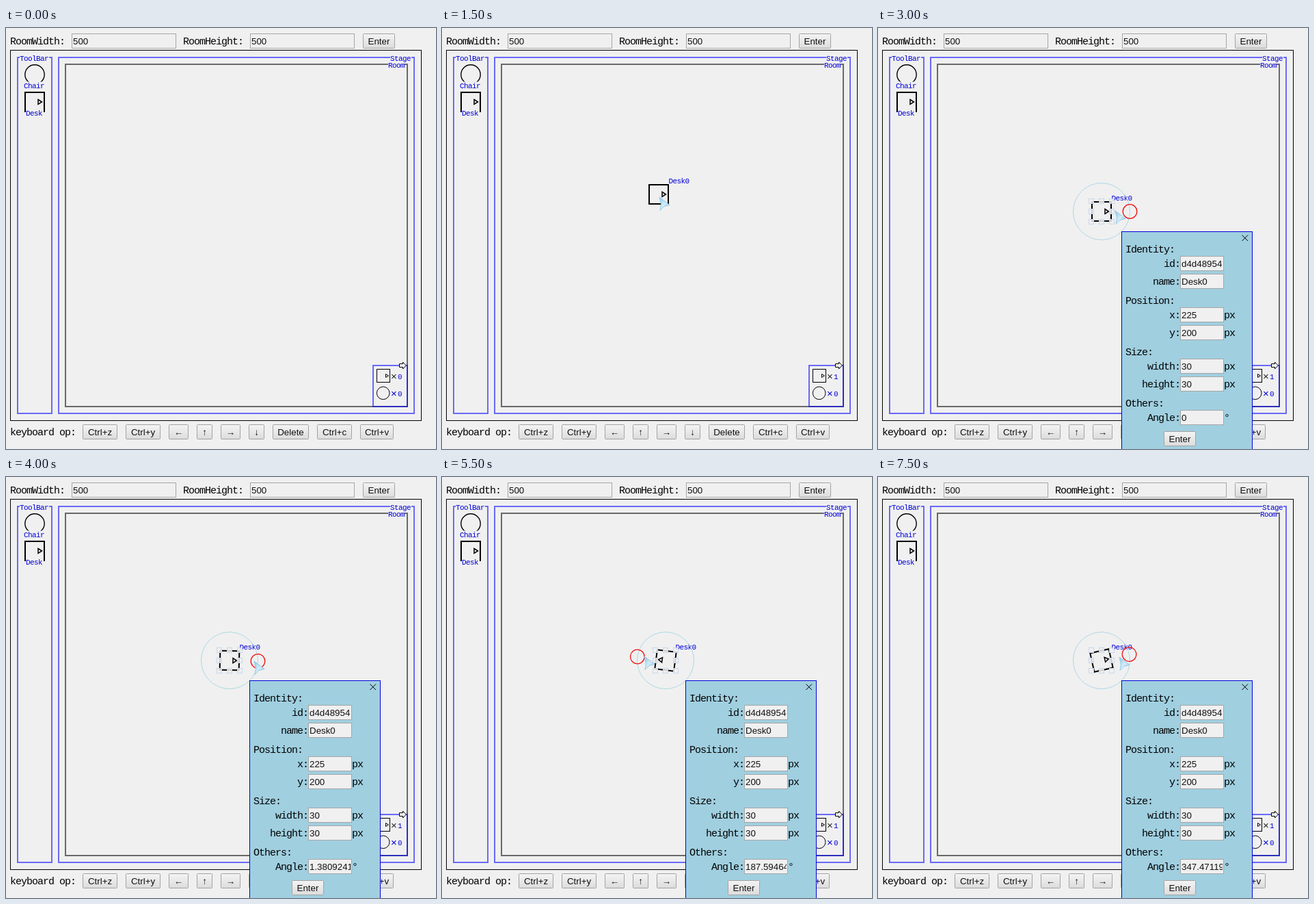
An HTML page for the animation above (8000 ms loop, 629 by 615 pixels).

```html
<!DOCTYPE html>
<html lang="en">
<head>
<meta charset="utf-8">
<title>Room planner</title>
<style>
  html, body { margin: 0; width: 100%; height: 100%; overflow: hidden; background: #f0f0f0; }
  svg { display: block; }
  text { white-space: pre; }
  .label { font: 15px "Liberation Mono", monospace; letter-spacing: -1px; fill: #000; }
  .tag { font: 11px "Liberation Mono", monospace; letter-spacing: -.6px; fill: #0000d8; }
  .ui { font: 13.333px "Liberation Sans", Arial, sans-serif; fill: #111; }
  .times { font: 15px "Liberation Sans", Arial, sans-serif; }
  .field { fill: #f0f0f0; stroke: #a6a6a6; }
  .button { fill: url(#face); stroke: #a3a3a3; }
  .ink { fill: none; stroke: #000; }
  .frame { fill: none; stroke: rgba(0, 0, 255, .56); stroke-width: 2; }
  .wall { fill: none; stroke: rgba(0, 0, 0, .56); stroke-width: 2; }
  .paper { fill: #f0f0f0; }
</style>
</head>
<body>
<svg id="stage" width="629" height="615" viewBox="0 0 629 615" xmlns="http://www.w3.org/2000/svg"></svg>
<script>
const STEP = 500;

// cursor x, y, desk x, y, angle shown in the panel
const steps = [
  [],
  [73, 110],
  [54, 105, 39, 87],
  [317, 246, 302, 228],
  [327, 267, 312, 258],
  [327, 262, 312, 253],
  [346, 266, 312, 253, '0'],
  [363, 267, 312, 253, '0'],
  [362, 268, 312, 253, '1.3809241'],
  [345, 295, 312, 253, '43.876697'],
  [312, 296, 312, 253, '120.36249'],
  [295, 261, 312, 253, '187.59464'],
  [314, 240, 312, 253, '245.21735'],
  [348, 245, 312, 253, '311.84028'],
  [357, 262, 312, 253, '352.70518'],
  [352, 262, 312, 253, '347.47119']
];

const text = (kind, x, y, s, more = '') => `<text class="${kind}" x="${x}" y="${y}" ${more}>${s}</text>`;
const rect = (kind, x, y, w, h, more = '') => `<rect class="${kind}" x="${x}" y="${y}" width="${w}" height="${h}" ${more}/>`;
const path = (kind, d, more = '') => `<path class="${kind}" d="${d}" ${more}/>`;
const circle = (x, y, r, color, width = 1) =>
  `<circle cx="${x}" cy="${y}" r="${r}" fill="none" stroke="${color}" stroke-width="${width}"/>`;

const field = (x, y, w, value, more = '') =>
  rect('field', x + .5, y + .5, w - 1, 21) + text('ui', x + 2, y + 16, value, more);

const button = (x, y, w, s) =>
  rect('button', x + .5, y + .5, w - 1, 21, 'rx="1"') +
  text('ui', x + w / 2, y + 16, s, 'text-anchor="middle"');

const deskShape = rect('ink', -14, -14, 28, 28, 'stroke-width="2"') +
  path('ink', 'M5 -3.5L10.5 0L5 3.5Z', 'stroke-width="1.5"');

function toolbar() {
  return path('frame', 'M20 43H17V563H67V43H63') + text('tag', 20, 48, 'ToolBar') +
    circle(42, 68, 14.2, '#000', 1.4) + rect('paper', 26, 78.5, 32, 11) + text('tag', 26, 88, 'Chair') +
    `<g transform="translate(42 108)">${deskShape}</g>` +
    rect('paper', 29, 119, 26, 11) + text('tag', 29, 128, 'Desk');
}

function counts() {
  return rect('frame', 537, 493, 50, 60) +
    path('', 'M575.5 490.5H580.5V488L585.5 493L580.5 498V495.5H575.5Z', 'fill="#f0f0f0" stroke="#000"') +
    rect('ink', 542.5, 498.5, 19, 19) + path('ink', 'M555.5 505.5L559.5 508L555.5 510.5Z') +
    text('times', 563, 514, '×', 'fill="#222"') + text('tag', 573, 513, '0', 'id="count"') +
    circle(551.7, 533.3, 9.3, '#000') +
    text('times', 563, 539, '×', 'fill="#0000d8"') + text('tag', 573, 538, '0');
}

function scene() {
  const keys = [[112, 51, 'Ctrl+z'], [175, 51, 'Ctrl+y'], [238, 29, '←'], [279, 23, '↑'], [314, 29, '→'],
    [355, 23, '↓'], [390, 53, 'Delete'], [455, 51, 'Ctrl+c'], [518, 49, 'Ctrl+v']];
  return text('label', 6, 24, 'RoomWidth:') + field(96, 8, 153, '500') +
    text('label', 259, 24, 'RoomHeight:') + field(357, 8, 153, '500') + button(522, 8, 47, 'Enter') +
    rect('ink', 6.5, 32.5, 601, 541) + toolbar() +
    path('frame', 'M562 43H77V563H597V43H593') + text('tag', 562, 48, 'Stage') +
    path('wall', 'M559 53H87V553H587V53H583') + text('tag', 559, 58, 'Room') +
    counts() + text('label', 6, 595, 'keyboard op:') +
    keys.map(([x, w, s]) => button(x, 579, w, s)).join('');
}

function grips() {
  let out = '';
  for (const x of [-15, 0, 15])
    for (const y of [-15, 0, 15])
      if (x || y) out += rect('', x - 3.5, y - 3.5, 7, 7, 'fill="#f0f0f0" fill-opacity=".85" stroke="#c6d8ee"');
  return out;
}

function panel() {
  const heads = [[328, 'Identity:'], [403, 'Position:'], [478, 'Size:'], [553, 'Others:']];
  const rows = [[333, 'id', 'd4d48954-'], [359, 'name', 'Desk0'], [408, 'x', '225', 'px'], [434, 'y', '200', 'px'],
    [483, 'width', '30', 'px'], [509, 'height', '30', 'px'], [558, 'Angle', '0', '°']];
  return rect('', 356.5, 297.5, 191, 330, 'fill="#a0cfe0" stroke="#0000d8"') +
    path('ink', 'M532.5 302.5L541 311M541 302.5L532.5 311') +
    heads.map(([y, s]) => text('label', 362, y, s)).join('') +
    rows.map(([y, name, value, unit = '']) =>
      text('label', 442 - 8 * (name.length + 1), y + 16, name + ':') +
      field(442, y, 64, value, `clip-path="url(#column)" ${name === 'Angle' ? 'id="angle"' : ''}`) +
      text('label', 506, y + 16, unit)).join('') +
    button(418, 589, 47, 'Enter');
}

document.getElementById('stage').innerHTML = `
  <defs>
    <linearGradient id="face" x2="0" y2="1"><stop stop-color="#f4f4f4"/><stop offset="1" stop-color="#dcdcdc"/></linearGradient>
    <linearGradient id="ice" x2="1" y2="1"><stop stop-color="#8cc8e8"/><stop offset=".5" stop-color="#d2ecf8"/><stop offset="1" stop-color="#8cc8ea"/></linearGradient>
    <clipPath id="column"><rect x="443" y="300" width="61" height="315"/></clipPath>
  </defs>
  ${scene()}
  <g id="desk">
    <g id="body">${deskShape}</g>
    ${text('tag', 14.5, -16, 'Desk0')}
    <g id="select">${grips()}${circle(0, 0, 41.5, '#add8e6')}<g id="knob">${circle(41.5, 0, 10.3, '#f01010', 1.3)}</g></g>
  </g>
  <g id="panel">${panel()}</g>
  ${path('', 'M1 1L16 12.5L8 14.5L2 20.5L3.5 12Z', 'id="cursor" fill="url(#ice)" stroke="#8fc6e4" stroke-width=".9" stroke-linejoin="round"')}`;

const part = {};
for (const id of ['desk', 'body', 'select', 'knob', 'panel', 'cursor', 'count', 'angle'])
  part[id] = document.getElementById(id);

const show = (node, on) => node.setAttribute('visibility', on ? 'visible' : 'hidden');
const move = (node, x, y) => node.setAttribute('transform', `translate(${x} ${y})`);

function draw(index) {
  const [cx, cy, x, y, angle] = steps[index];
  const placed = x !== undefined;
  const chosen = angle !== undefined;
  const turn = `rotate(${angle || 0})`;
  show(part.cursor, cx !== undefined);
  show(part.desk, placed);
  show(part.select, chosen);
  show(part.panel, chosen);
  move(part.cursor, cx || 0, cy || 0);
  move(part.desk, (x || 0) + 15, (y || 0) + 15);
  part.body.setAttribute('transform', turn);
  part.knob.setAttribute('transform', turn);
  part.count.textContent = placed ? '1' : '0';
  part.angle.textContent = angle || '0';
}

const start = performance.now();
let last = 0;
function tick() {
  const index = Math.floor((performance.now() - start) / STEP) % steps.length;
  if (index !== last) draw(last = index);
  requestAnimationFrame(tick);
}
draw(0);
tick();
</script>
</body>
</html>
```
